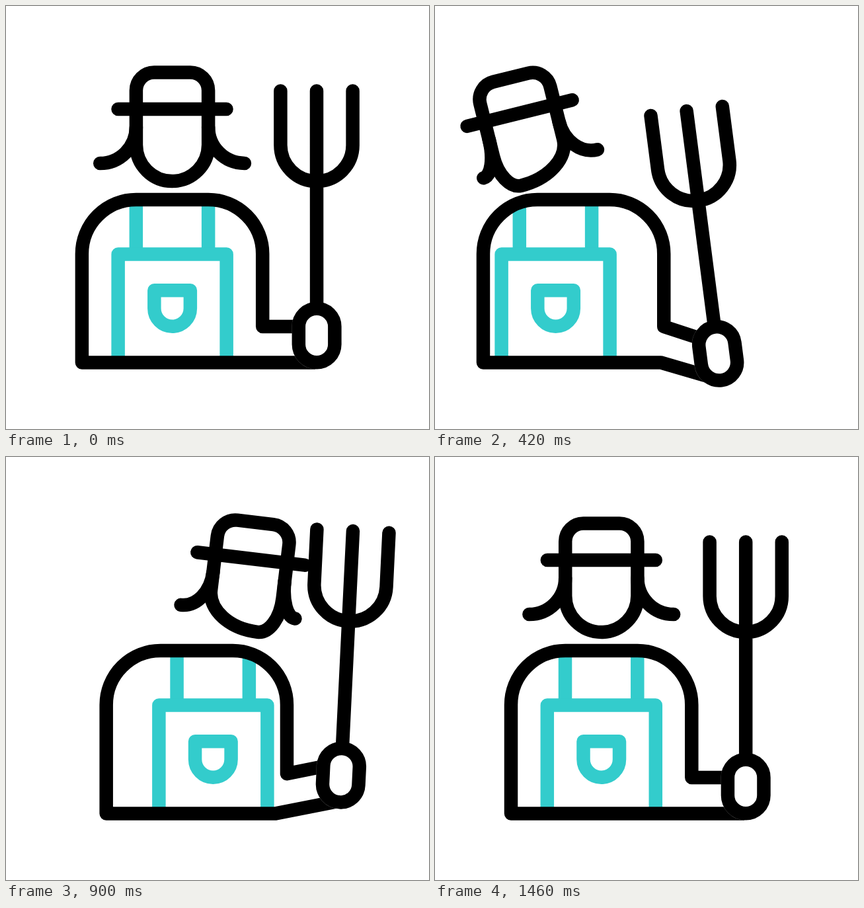
An HTML page that plays this animation: 640x640 px, repeating every 2.4 s.

```html
<!DOCTYPE html>
<html lang="en">
<head>
<meta charset="utf-8">
<title>Farmer with pitchfork</title>
<style>
  html, body { margin: 0; width: 100%; height: 100%; overflow: hidden; background: #fff; }
  svg { display: block; width: 100vw; height: 100vh; }
  .line { fill: none; stroke: #000; stroke-width: 20.5; stroke-linecap: round; stroke-linejoin: round; }
  .apron { stroke: #3cc; }
  .flat { stroke-linecap: butt; }
</style>
</head>
<body>
<svg viewBox="0 0 640 640">
  <g id="apron" class="line apron">
    <path class="flat" d="M197 302V375M306.3 302V375"/>
    <path d="M169.8 535V375.5H333.8V535"/>
    <path d="M224.5 430.3H279V457.5a27.25 27.25 0 0 1-54.5 0Z"/>
  </g>
  <path id="body" class="line flat"/>
  <g id="hand" class="line">
    <rect x="-27.25" y="-40.75" width="54.5" height="81.5" rx="27.25"
      stroke="#fff" style="stroke:#fff;stroke-width:21.2;stroke-opacity:.3"/>
    <rect x="-27.25" y="-40.75" width="54.5" height="81.5" rx="27.25" style="fill:#fff"/>
    <path d="M0 -370V-42M-54.6 -370V-288a54.6 54.6 0 0 0 109.2 0V-370"/>
  </g>
  <g id="head" class="line">
    <path d="M-82 0H82"/>
    <path id="face"/>
    <path id="hair"/>
  </g>
</svg>
<script>
const LOOP = 2400;
const LEFT = 420, RIGHT = 920, END = 1460;
const TIMES = [0, 180, LEFT, 580, 760, RIGHT, 1080, END];
const SPANS = [[0, 2], [2, 5], [5, 7]];
const K = 0.5523;

// Curved tracks: one value per entry of TIMES, closing on the first
const curves = {
  apron: [0, -29.2, -69.4, -29.4, 23.6, 66, 46.2],
  headX: [0, -52, -124, -53.5, 50, 126, 89],
  headY: [0, 0.5, 6, 11.3, 5.5, -3, -2.7],
  tilt:  [0, -5.9, -14, -8.2, 1.4, 7.2, 5.05],
  chin:  [0, -10, -24, -16.5, 5, 25, 18],
  hairL: [0, 11.7, 32.5, 29.6, 18.6, 12, 8.4],
  hairR: [0, -3.6, -8.4, -13.8, -22.6, -34, -25]
};

const $ = id => document.getElementById(id);

// Rest, leftmost and rightmost values joined by straight motion
function swing(t, rest, left, right) {
  const mix = (a, b, from, to) => a + (b - a) * (t - from) / (to - from);
  if (t < LEFT) return mix(rest, left, 0, LEFT);
  if (t < RIGHT) return mix(left, right, LEFT, RIGHT);
  return mix(right, rest, RIGHT, END);
}

// Smooth polynomial through the values of the current span
function curve(t, name) {
  const v = [...curves[name], curves[name][0]];
  const [a, b] = SPANS[t < LEFT ? 0 : t < RIGHT ? 1 : 2];
  let sum = 0;
  for (let i = a; i <= b; i++) {
    let w = v[i];
    for (let j = a; j <= b; j++) {
      if (j !== i) w *= (t - TIMES[j]) / (TIMES[i] - TIMES[j]);
    }
    sum += w;
  }
  return sum;
}

function facePath(chin, low) {
  const s = 54.6, y = 54, r = 27.3, h = y + (low - y) * K;
  const toLeft = chin + (-s - chin) * K, toRight = chin + (s - chin) * K;
  return `M${-s} ${y}V-28.2a${r} ${r} 0 0 1 ${r} ${-r}H${s - r}a${r} ${r} 0 0 1 ${r} ${r}V${y}` +
    `C${s} ${h} ${toRight} ${low} ${chin} ${low}S${-s} ${h} ${-s} ${y}Z` .replace("S", `C${toLeft} ${low} `);
}

function strand(x, end) {
  return `M${x} 27C${x} ${27 + 55 * K} ${end + (x - end) * K} 82 ${end} 82`;
}

function draw(now) {
  const t = Math.min(now % LOOP, END);

  const x = swing(t, 0, -42.2, 39.8);
  const handX = 470.2 + x;
  const handY = 498.5 + swing(t, 0, 27.5, -18.6);
  const elbow = swing(t, 485, 485, 479);
  const bend = x + swing(t, 388, 383.5, 371);
  const top = handY + swing(t, -13.5, -23, -13);
  const base = handY + swing(t, 41, 38.3, 38.8);

  $("body").setAttribute("d",
    `M${handX - 27} ${top}L${388.3 + x} ${elbow}V375a82 82 0 0 0-82-82H${197 + x}` +
    `a82 82 0 0 0-82 82V539.4H${bend}L${handX - 2} ${base}`);
  $("hand").setAttribute("transform",
    `translate(${handX} ${handY}) rotate(${swing(t, 0, -7.4, 3.2)})`);
  $("apron").setAttribute("transform", `translate(${curve(t, "apron")})`);

  $("head").setAttribute("transform",
    `translate(${251.8 + curve(t, "headX")} ${156 + curve(t, "headY")}) rotate(${curve(t, "tilt")})`);
  $("face").setAttribute("d", facePath(curve(t, "chin"), swing(t, 109, 107, 109)));
  $("hair").setAttribute("d",
    strand(-54.6, -109.4 + curve(t, "hairL")) + strand(54.6, 109.4 + curve(t, "hairR")));
}

function tick() {
  draw(performance.now());
  requestAnimationFrame(tick);
}
tick();
</script>
</body>
</html>
```
